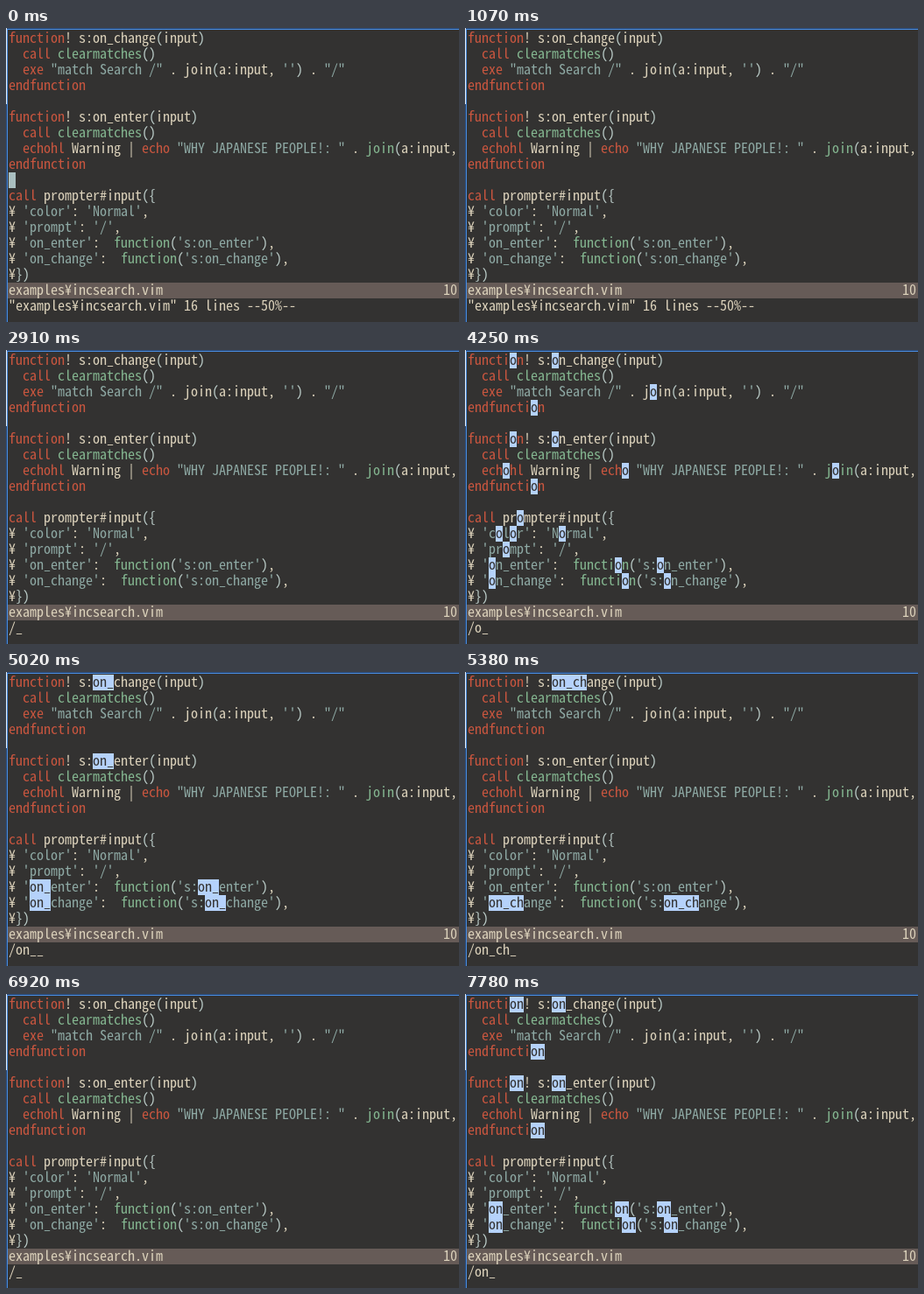
Animation, 517 px wide and 336 px high, one loop 8 s. Source, as an HTML page:

```html
<!DOCTYPE html>
<html lang="en">
<head>
<meta charset="utf-8">
<title>Incremental search</title>
<style>
  html, body { margin: 0; width: 100%; height: 100%; overflow: hidden; background: #333231; }
  svg { display: block; }
  text {
    font-family: "Noto Sans Mono CJK JP", "Noto Sans Mono", monospace;
    font-size: 16px;
    font-kerning: none;
    font-variant-ligatures: none;
    white-space: pre;
    fill: #dcd2bb;
  }
  .key { fill: #c9563f; }
  .str { fill: #8ea9a4; }
  .fn { fill: #84b690; }
  .paren { fill: #bccdc9; }
  .dark { fill: #333231; }
  .hit { fill: #b5d2fb; }
  .cursor { fill: #a9bfc0; }
  .edge { fill: #4a8ee2; }
  .outer { fill: #28436c; }
</style>
</head>
<body>
<svg id="stage" width="517" height="336" viewBox="0 0 517 336">
  <rect width="517" height="336" fill="#333231"/>
  <rect class="outer" width="517" height="1"/>
  <rect class="outer" width="1" height="336"/>
  <rect width="1" height="87" fill="#dfe6ee"/>
  <rect class="edge" x="1" y="1" width="516" height="1"/>
  <rect class="edge" x="1" y="1" width="1" height="335"/>
  <rect x="2" y="291" width="515" height="18" fill="#665b57"/>
  <g id="base"></g>
  <g id="live"></g>
</svg>
<script>
const LOOP = 8000, LEFT = 3, TOP = 3, CW = 8, LH = 18;
const STATUS = 16, CMD = 17;

const code = String.raw`function! s:on_change(input)
  call clearmatches()
  exe "match Search /" . join(a:input, '') . "/"
endfunction

function! s:on_enter(input)
  call clearmatches()
  echohl Warning | echo "WHY JAPANESE PEOPLE!: " . join(a:input,
endfunction

call prompter#input({
¥ 'color': 'Normal',
¥ 'prompt': '/',
¥ 'on_enter':  function('s:on_enter'),
¥ 'on_change':  function('s:on_change'),
¥})`.split("\n");

// Calls after "exe" stay plain.
const TOKEN = /(?<str>"[^"]*"|'[^']*')|(?<fn>(?<!exe .*)\b(?:clearmatches|join|function)(?=\())|(?<key>\b(?:endfunction|function|call|exe|echohl|echo)\b)|(?<paren>[(){}]+)|[\w:#]+|[^\w\s"'(){}]+/g;

const base = document.getElementById("base");
const live = document.getElementById("live");

function add(parent, tag, attrs, body = "") {
  const el = document.createElementNS("http://www.w3.org/2000/svg", tag);
  for (const k in attrs) el.setAttribute(k, attrs[k]);
  el.textContent = body;
  parent.appendChild(el);
  return el;
}

function write(parent, row, col, str, cls = "") {
  add(parent, "text", { x: LEFT + col * CW, y: TOP + row * LH + 14, class: cls }, str);
}

function block(row, col, str, cls) {
  add(live, "rect", {
    x: LEFT + col * CW, y: TOP + row * LH,
    width: str.length * CW, height: LH, class: cls
  });
  write(live, row, col, str, "dark");
}

// Keep every glyph on the 8px grid whichever monospace font is found.
function fitFont() {
  const probe = add(base, "text", {}, "M".repeat(20));
  const size = 16 * CW * 20 / probe.getComputedTextLength();
  probe.remove();
  const sheet = document.styleSheets[0];
  sheet.insertRule(`svg text { font-size: ${size.toFixed(2)}px }`, sheet.cssRules.length);
}

function drawCode() {
  code.forEach((line, row) => {
    for (const m of line.matchAll(TOKEN)) {
      const cls = Object.keys(m.groups).find(k => m.groups[k]);
      write(base, row, m.index, m[0], cls);
    }
  });
  write(base, STATUS, 0, "examples¥incsearch.vim");
}

// Each step changes only the fields it names.
const steps = [];
let last = { cmd: '"examples¥incsearch.vim" 16 lines --50%--', find: "", cursor: [9, 0], line: 10 };
function at(t, change) {
  last = { ...last, ...change, t };
  steps.push(last);
}
const search = (t, q) => at(t, { find: q, cmd: `/${q}_` });

at(0, {});
at(340, { cursor: null });
at(580, { cursor: [9, 0] });
at(980, { cursor: null });
at(1080, { cursor: [10, 0] });
at(1130, { line: 11 });
at(1530, { cursor: [9, 0], line: 10 });

[1870, 2180, 2400, 2450, 2660].forEach((t, i) =>
  at(t, { cmd: ":so %".slice(0, i + 1), cursor: [CMD, i + 1] }));

at(2910, { cmd: "/_", cursor: null });
search(4250, "o");
search(4590, "on");
at(4990, { find: "on_", cmd: "" });
search(5020, "on_");
search(5290, "on_c");
search(5350, "on_ch");
search(5410, "on_cha");
at(5470, { find: "on_chan", cmd: "" });
search(5530, "on_chan");
search(5590, "on_chang");
at(5650, { find: "on_change", cmd: "" });
search(5710, "on_change");
search(6920, "");
at(7670, { find: "o" });
search(7700, "o");
at(7740, { find: "on" });
search(7780, "on");

function draw(s) {
  live.textContent = "";
  write(live, STATUS, 62, String(s.line));
  write(live, CMD, 0, s.cmd);
  if (s.find) {
    code.forEach((line, row) => {
      for (let c = line.indexOf(s.find); c >= 0; c = line.indexOf(s.find, c + s.find.length))
        block(row, c, s.find, "hit");
    });
  }
  if (s.cursor) {
    const [row, col] = s.cursor;
    block(row, col, (code[row] || "")[col] || " ", "cursor");
  }
}

let shown;
const start = performance.now();
function tick() {
  const t = (performance.now() - start) % LOOP;
  const s = steps.findLast(step => step.t <= t) || steps[0];
  if (s !== shown) draw(shown = s);
  requestAnimationFrame(tick);
}

fitFont();
drawCode();
tick();
</script>
</body>
</html>
```
